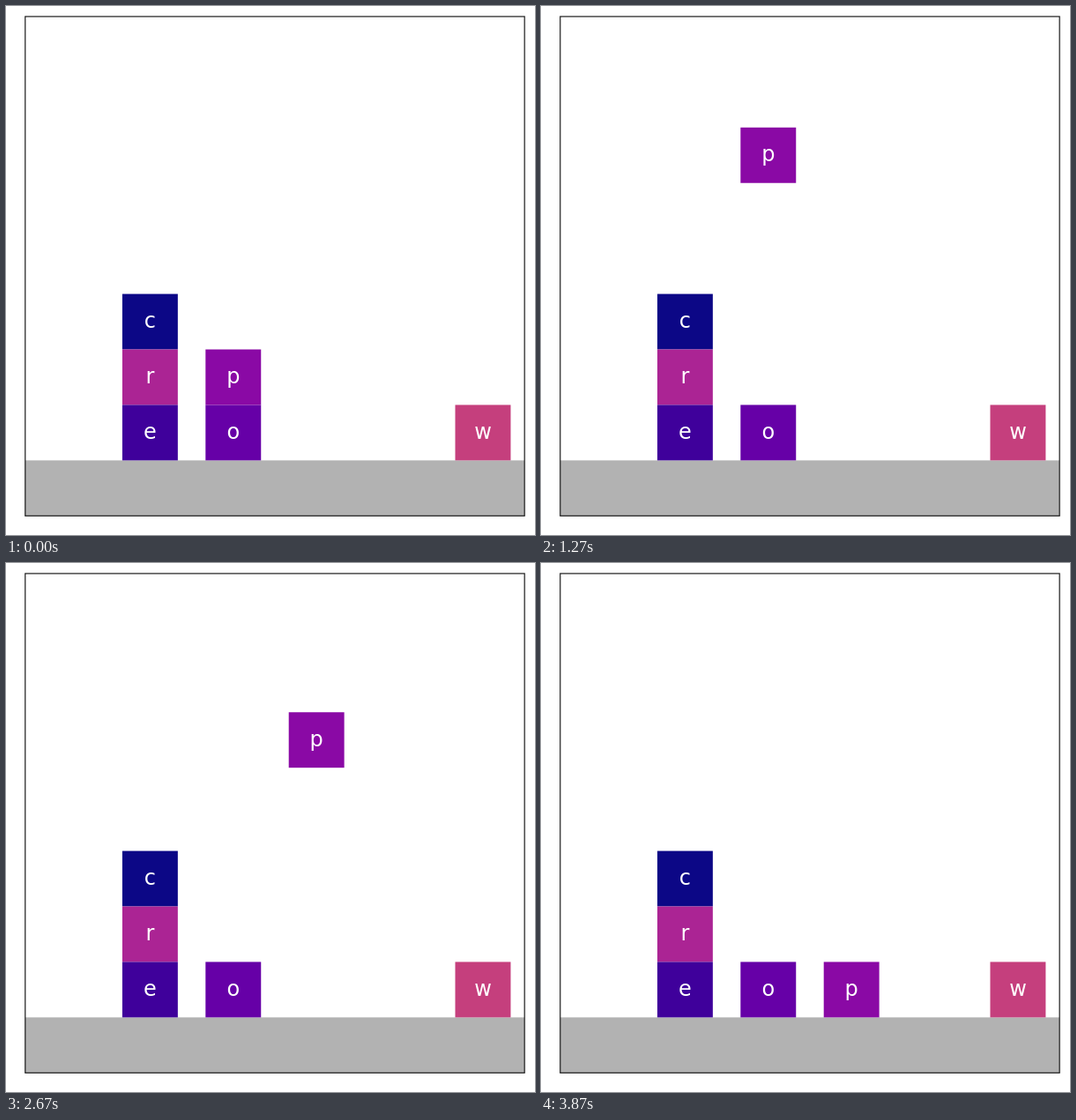
An HTML page for the animation above (4870 ms loop, 600 px wide and 600 px high).

```html
<!DOCTYPE html>
<html lang="en">
<head>
<meta charset="utf-8">
<title>Stacking blocks</title>
<style>
  html, body { margin: 0; width: 100%; height: 100%; overflow: hidden; background: #fff; }
  svg { display: block; width: 600px; height: 600px; }
  text { font: 24px "DejaVu Sans", sans-serif; fill: #fff; text-anchor: middle; }
</style>
</head>
<body>
<svg id="stage" viewBox="0 0 600 600"></svg>
<script>
const LOOP = 4870;
const LEFT = 21.8, TOP = 11.95, SIZE = 566.35;
const U = SIZE / 9;                 // side of one block
const FLOOR = TOP + 8 * U;
const stage = document.getElementById('stage');

// letter, column, level, colour
const blocks = [
  ['c', 1, 2, '#0c0786'],
  ['r', 1, 1, '#ab2494'],
  ['e', 1, 0, '#3f009b'],
  ['o', 2, 0, '#6600a7'],
  ['w', 5, 0, '#c53f7d'],
  ['p', 2, 1, '#8a09a5']
];

function add(parent, tag, attrs) {
  const el = document.createElementNS('http://www.w3.org/2000/svg', tag);
  for (const key in attrs) el.setAttribute(key, attrs[key]);
  return parent.appendChild(el);
}

function addBlock([letter, col, level, fill]) {
  const x = LEFT + (0.25 + 1.5 * col) * U;
  const y = FLOOR - (level + 1) * U;
  const g = add(stage, 'g', {});
  add(g, 'rect', { x, y, width: U, height: U, fill });
  add(g, 'text', { x: x + U / 2, y: Math.round(y + U / 2 + 7) }).textContent = letter;
  return g;
}

add(stage, 'rect', { x: LEFT, y: FLOOR, width: SIZE, height: U, fill: '#b2b2b2' });
const mover = blocks.map(addBlock).pop();
add(stage, 'rect', {
  x: LEFT, y: TOP, width: SIZE, height: SIZE,
  fill: 'none', stroke: '#1a1a1a', 'stroke-width': 1.2
});

const clamp = (v, max) => Math.max(0, Math.min(v, max));

// 15 steps per second, on a 10 ms clock: 0, 70, 130, 200, ...
function stepAt(t) {
  const rest = t % 200;
  return 3 * Math.floor(t / 200) + (rest >= 70) + (rest >= 130);
}

function draw(t) {
  const i = stepAt(t);
  const rise = i < 1 ? 0 : 0.2 * clamp(i + 1, 20);
  const slide = i < 30 ? 0 : 0.15 * clamp(i - 28, 10);
  const drop = 0.25 * clamp(i - 38, 20);
  mover.setAttribute('transform', `translate(${slide * U} ${(drop - rise) * U})`);
}

const start = performance.now();
function tick() {
  draw((performance.now() - start) % LOOP);
  requestAnimationFrame(tick);
}
tick();
</script>
</body>
</html>
```
